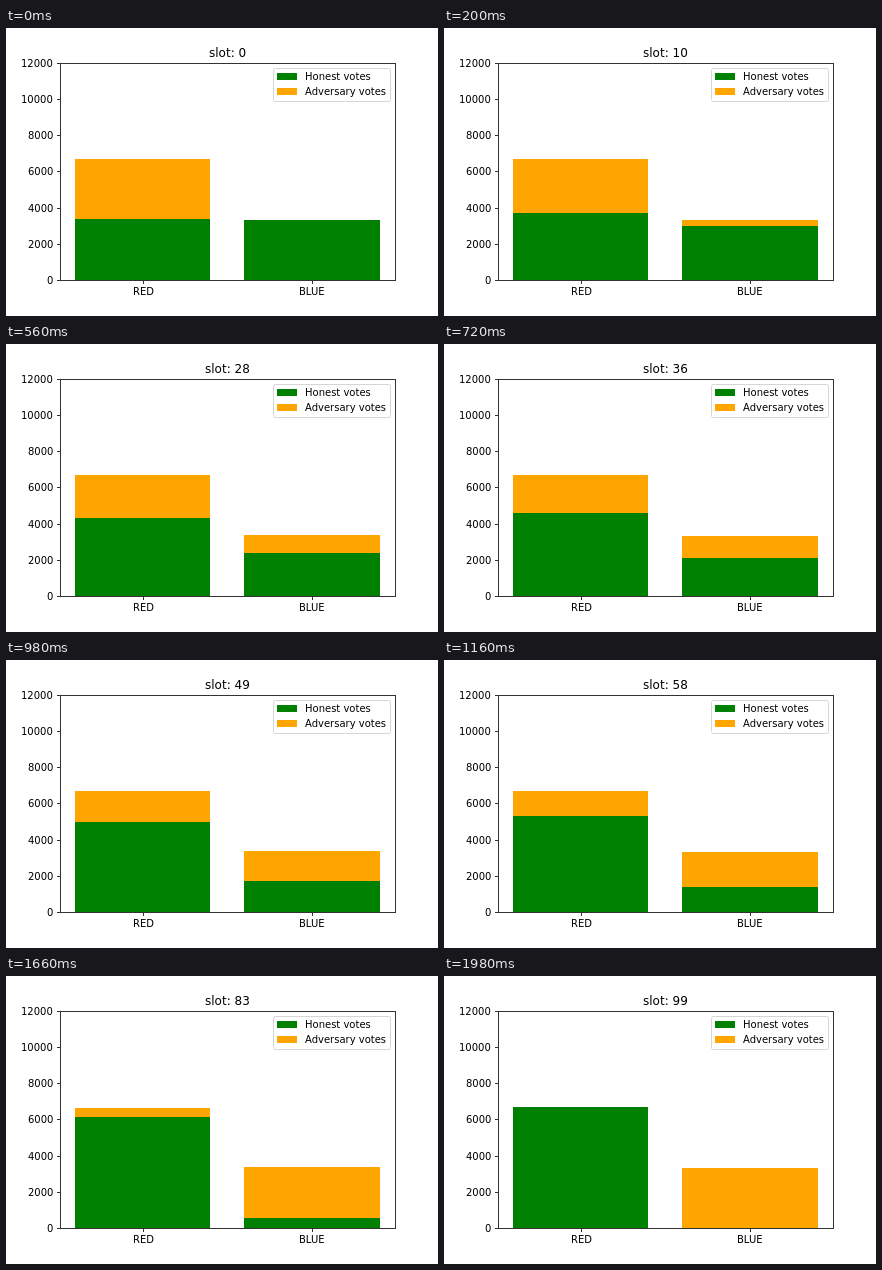
An HTML page with a canvas for the animation above (2000 ms loop, 432 by 288 pixels).

```html
<!DOCTYPE html>
<html lang="en">
<head>
<meta charset="utf-8">
<title>Votes per slot</title>
<style>
html, body { margin: 0; width: 100%; height: 100%; overflow: hidden; background: #fff; }
canvas { display: block; }
</style>
</head>
<body>
<canvas id="chart" width="432" height="288"></canvas>
<script>
const ctx = document.getElementById('chart').getContext('2d');
const STEP = 20, SLOTS = 100;
const GREEN = '#008000', ORANGE = '#ffa500', AXIS = '#333';
const LEFT = 54, RIGHT = 389, TOP = 35, BASE = 252;
const PX_PER_VOTE = 217.44 / 12000;

const yOf = votes => Math.round(BASE - votes * PX_PER_VOTE);

function rect(color, x0, y0, x1, y1) {
  ctx.fillStyle = color;
  ctx.fillRect(x0, y0, x1 - x0, y1 - y0);
}

// align: 0 = left, 0.5 = centre, 1 = right; starts on a whole pixel
function label(text, x, y, align = 0, size = 10) {
  ctx.font = size + 'px "DejaVu Sans", sans-serif';
  ctx.fillStyle = '#000';
  ctx.fillText(text, Math.round(x - ctx.measureText(text).width * align), y);
}

function votesAt(slot) {
  // small pseudo-random swing of the split between the two sides
  const swing = 18 * Math.cos(2 * Math.PI * 0.4153 * (slot - 83));
  return {
    red: { honest: 3345 + 33.6 * slot, total: 6667 - swing },
    blue: { honest: 3334 - 33.6 * slot, total: 3333 + swing }
  };
}

function bar(x0, x1, { honest, total }) {
  const mid = yOf(honest);
  rect(GREEN, x0, mid, x1, BASE);
  rect(ORANGE, x0, Math.min(mid, yOf(total)), x1, mid);
}

function axes() {
  for (let v = 0; v <= 12000; v += 2000) {
    const y = yOf(v);
    rect(AXIS, LEFT - 3, y, LEFT, y + 1);
    label(String(v), 47, y + 4, 1);
  }
  [[137, 'RED'], [306, 'BLUE']].forEach(([x, name]) => {
    rect(AXIS, x, BASE + 1, x + 1, BASE + 4);
    label(name, x, 267, 0.5);
  });
  ctx.strokeStyle = AXIS;
  ctx.lineWidth = 1;
  ctx.strokeRect(LEFT + 0.5, TOP + 0.5, RIGHT - LEFT, BASE - TOP);
}

function legend() {
  ctx.beginPath();
  ctx.roundRect(267.5, 40.5, 117, 33, 2);
  ctx.strokeStyle = '#d6d6d6';
  ctx.stroke();
  [[GREEN, 'Honest votes'], [ORANGE, 'Adversary votes']].forEach(([color, name], i) => {
    const y = 52 + 15 * i;
    rect(color, 271, y - 7, 291, y);
    label(name, 299, y);
  });
}

function draw(slot) {
  rect('#fff', 0, 0, 432, 288);
  const votes = votesAt(slot);
  bar(69, 204, votes.red);
  bar(238, 374, votes.blue);
  axes();
  legend();
  label('slot: ' + slot, 221.4, 29, 0.5, 12);
}

const start = performance.now();
function tick() {
  draw(Math.floor((performance.now() - start) / STEP) % SLOTS);
  requestAnimationFrame(tick);
}
tick();
</script>
</body>
</html>
```
